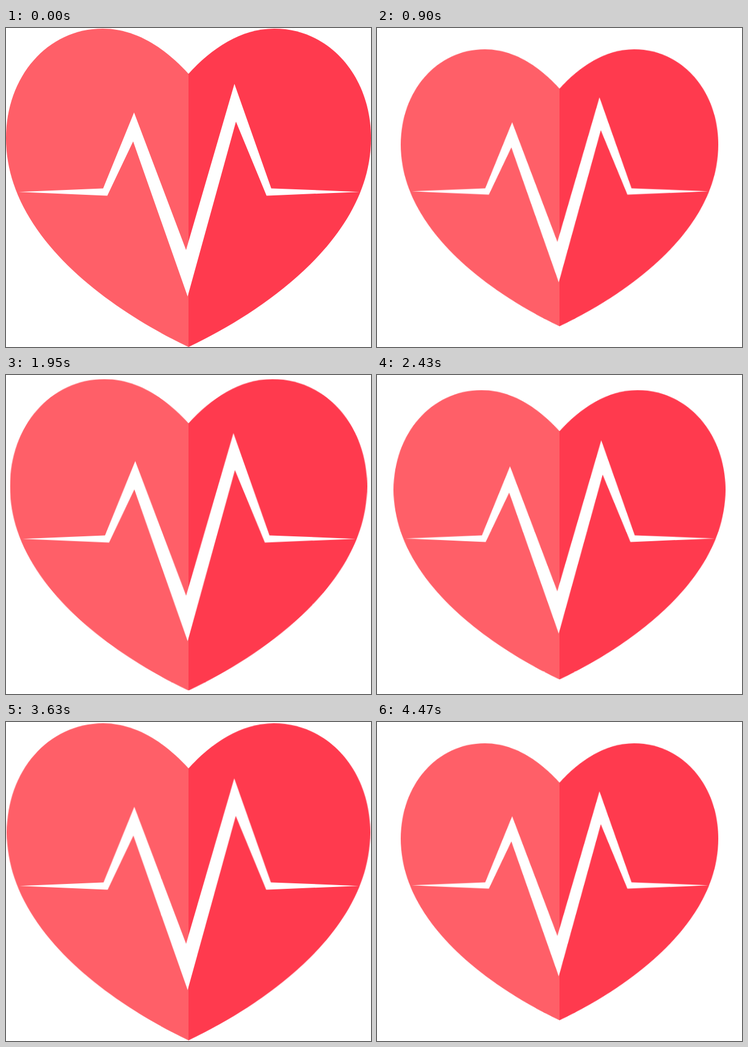
Write an HTML page that moves like this. It is 600 by 524 pixels and loops after 4500 ms.

```html
<!DOCTYPE html>
<html lang="en">
<head>
<meta charset="utf-8">
<title>Heartbeat</title>
<style>
  html, body { margin: 0; width: 100%; height: 100%; overflow: hidden; background: #fff; }
  svg { display: block; width: 100%; height: 100%; }
  #heart { transform-origin: 300px 262px; }
</style>
</head>
<body>
<svg viewBox="0 0 600 524">
  <defs>
    <path id="half" d="M300 75.2C262 33.5 214 1 159 1C68 1 0 80 0 181C0 342 170 462 300 524Z"/>
  </defs>
  <g id="heart">
    <use href="#half" fill="#ff5f68"/>
    <use href="#half" fill="#ff3a4e" transform="matrix(-1 0 0 1 600 0)"/>
    <path id="pulse" fill="#fff" d="M21 269.2L159.7 263.4L210.5 138.7L296 364.7L375.5 91.7L436 263.4L581 269.2L428.3 275.4L378 153.8L298.6 441L209 186.3L166.5 275.4Z"/>
  </g>
</svg>
<script>
  const LOOP = 4500;
  const BIG = 1, SMALL = 0.87;

  // [start in ms, scale, steps until the next entry]
  const beats = [
    [0, BIG, 30],
    [900, SMALL, 30],
    [1800, BIG, 30],
    [2700, SMALL, 30],
    [3600, BIG, 29],
    [4470, SMALL, 1],
    [LOOP, SMALL, 1],
  ];

  document.getElementById('heart').animate(
    beats.map(([time, scale, steps]) => ({
      offset: time / LOOP,
      transform: `scale(${scale})`,
      easing: `steps(${steps}, end)`,
    })),
    { duration: LOOP, iterations: Infinity }
  );
</script>
</body>
</html>
```
